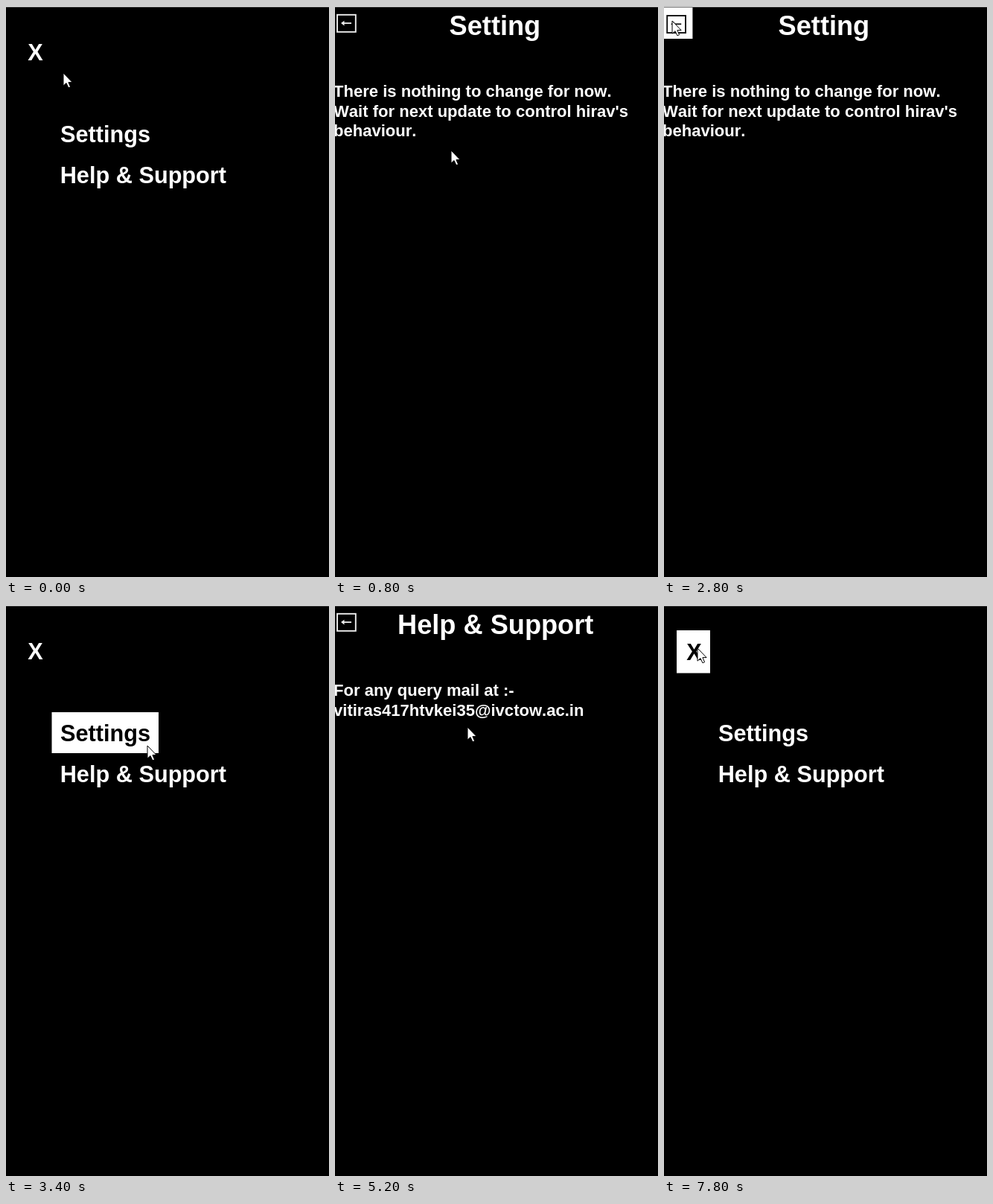
These frames come from a looping animation (434x767 px, 8000 ms). An HTML page with a canvas:

```html
<!DOCTYPE html>
<html lang="en">
<head>
<meta charset="utf-8">
<title>Menu</title>
<style>
  html, body { margin: 0; width: 434px; height: 767px; overflow: hidden; background: #000; }
  canvas { display: block; }
</style>
</head>
<body>
<canvas id="stage" width="434" height="767"></canvas>
<script>
const ctx = document.getElementById('stage').getContext('2d');
const LOOP = 8000;
const BODY = 22.05, TITLE = 36.2, ITEM = 30.7;

// Buttons: box, then label position
const menuButtons = [
  { x: 17, y: 34, w: 45, h: 57.5, label: 'X', tx: 29.3, ty: 73 },
  { x: 61.5, y: 144, w: 143.5, h: 55, label: 'Settings', tx: 73, ty: 183 },
  { x: 61.5, y: 199, w: 246.5, h: 57, label: 'Help & Support', tx: 72.7, ty: 238 }
];
const backButton = { x: 0, y: 2, w: 38.4, h: 42 };

const pages = {
  setting: {
    title: 'Setting', x: 153.6,
    lines: ['There is nothing to change for now.', "Wait for next update to control hirav's", 'behaviour.']
  },
  help: {
    title: 'Help & Support', x: 84,
    lines: ['For any query mail at :-', 'vitiras417htvkei35@ivctow.ac.in']
  }
};

// Time, page, pointer x, pointer y, mouse button held
const steps = [
  [0, 'menu', 77, 90],
  [200, 'menu', 112, 136],
  [400, 'menu', 156, 194],
  [600, 'menu', 156, 194, true],
  [800, 'setting', 156, 194],
  [1000, 'setting', 92, 122],
  [1200, 'setting', 22, 48],
  [1400, 'setting', 14, 24],
  [1600, 'setting', 11, 20],
  [2800, 'setting', 11, 20, true],
  [3000, 'menu', 11, 20],
  [3200, 'menu', 118, 124],
  [3400, 'menu', 190, 189],
  [3600, 'menu', 214, 206],
  [4400, 'menu', 214, 206, true],
  [4600, 'help', 214, 206],
  [5200, 'help', 178, 164],
  [5400, 'help', 98, 84],
  [5600, 'help', 34, 30],
  [5800, 'help', 16, 17],
  [6400, 'help', 15, 15.5],
  [6600, 'help', 15, 15.5, true],
  [6800, 'menu', 15, 16],
  [7200, 'menu', 32, 44],
  [7400, 'menu', 45, 58],
  [7800, 'menu', 45, 58, true]
];

function text(str, x, y, size, color = '#fff') {
  ctx.font = `bold ${size}px "Liberation Sans", Arial, sans-serif`;
  ctx.fillStyle = color;
  ctx.fillText(str, x, y);
}

function isOver(b, x, y) {
  return x >= b.x && x < b.x + b.w && y >= b.y && y < b.y + b.h;
}

function fillButton(b) {
  ctx.fillStyle = '#fff';
  ctx.fillRect(b.x, b.y, b.w, b.h);
}

function drawMenu(x, y, held) {
  for (const b of menuButtons) {
    const over = isOver(b, x, y);
    const shift = over && held ? 1 : 0;
    if (over) fillButton(b);
    text(b.label, b.tx + shift, b.ty + shift, ITEM, over ? '#000' : '#fff');
  }
}

function drawBack(x, y, held) {
  const over = isOver(backButton, x, y);
  if (over) fillButton(backButton);
  ctx.save();
  if (over && held) ctx.translate(1.2, 1.2);
  ctx.strokeStyle = over ? '#111' : '#eee';
  ctx.fillStyle = ctx.strokeStyle;
  ctx.lineWidth = 1.9;
  ctx.strokeRect(3, 11.8, 24.8, 23);
  ctx.fillRect(10, 22.2, 12, 1.8);
  ctx.beginPath();
  ctx.moveTo(8, 23.1);
  ctx.lineTo(12.5, 19.8);
  ctx.lineTo(12.5, 26.4);
  ctx.fill();
  ctx.restore();
}

function drawPage(page, x, y, held) {
  text(page.title, page.x, 39, TITLE);
  page.lines.forEach((line, i) => text(line, -2, 122.4 + i * 26.4, BODY));
  drawBack(x, y, held);
}

function drawPointer(x, y) {
  const shape = [[0, 0], [0, 17.2], [4, 13.6], [6.9, 19.8], [9.6, 18.7], [6.9, 12.6], [12.1, 12.6]];
  ctx.beginPath();
  shape.forEach(([dx, dy]) => ctx.lineTo(x + dx, y + dy));
  ctx.closePath();
  ctx.fillStyle = '#fff';
  ctx.fill();
  ctx.strokeStyle = '#000';
  ctx.lineWidth = 1;
  ctx.stroke();
}

function draw(t) {
  const [, name, x, y, held] = steps.findLast(s => s[0] <= t);
  ctx.fillStyle = '#000';
  ctx.fillRect(0, 0, 434, 767);
  ctx.fillStyle = '#f0f0f0';
  ctx.fillRect(0, 0, 434, 1.4);
  ctx.fontKerning = 'none';
  if (name === 'menu') drawMenu(x, y, held);
  else drawPage(pages[name], x, y, held);
  drawPointer(x, y);
}

const start = performance.now();
function tick() {
  draw((performance.now() - start) % LOOP);
  requestAnimationFrame(tick);
}
tick();
</script>
</body>
</html>
```
